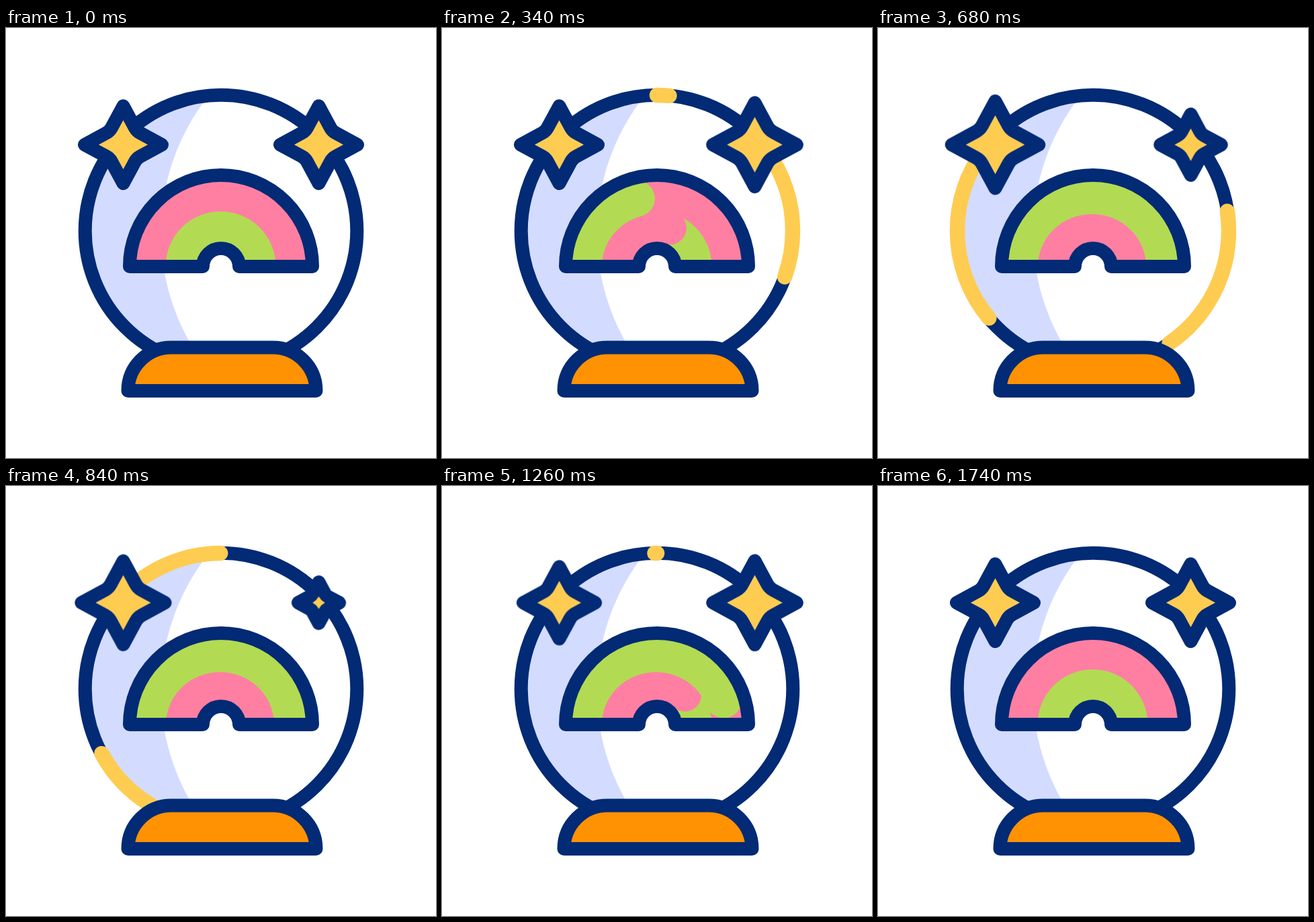
Write an HTML page that moves like this. It is 640 px wide and 640 px high and loops after 3 s.

```html
<!DOCTYPE html>
<html lang="en">
<head>
<meta charset="utf-8">
<title>Crystal ball</title>
<style>
  @property --front { syntax: "<length>"; inherits: false; initial-value: 0px; }
  @property --tail { syntax: "<length>"; inherits: false; initial-value: 0px; }
  @property --size { syntax: "<number>"; inherits: false; initial-value: 1; }

  :root {
    --navy: #022a75;
    --pink: #ff7fa2;
    --green: #b2db53;
    --yellow: #ffcc52;
  }
  html, body { margin: 0; width: 100%; height: 100%; overflow: hidden; background: #fff; }
  svg { display: block; width: 100%; height: 100%; }

  .outline { stroke: var(--navy); stroke-width: 20; stroke-linejoin: round; }

  /* A stroke drawn from --tail to --front along its path */
  .trim {
    fill: none;
    stroke-linecap: round;
    opacity: 0;
    stroke-dasharray: calc(var(--front) - var(--tail)) 999px;
    stroke-dashoffset: calc(var(--tail) * -1);
  }

  .trail {
    stroke: var(--yellow);
    stroke-width: 22.5;
    animation: trail-front 3s infinite, trail-tail 3s infinite, trail-show 3s step-end infinite;
    animation-timing-function: cubic-bezier(.354, 0, .765, 1), cubic-bezier(.354, 0, .765, 1), step-end;
  }
  .trail.late { animation-delay: 276ms; }
  @keyframes trail-front { 0% { --front: 0px } 28.333%, 100% { --front: 360px } }
  @keyframes trail-tail { 0%, 3.333% { --tail: 0px } 33.5%, 100% { --tail: 360px } }
  @keyframes trail-show { 0% { opacity: 0 } .4% { opacity: 1 } 33.5%, 100% { opacity: 0 } }

  .band {
    animation: band-sweep 3s infinite, band-show 3s infinite;
    animation-timing-function: cubic-bezier(.333, 0, .667, 1), step-end;
  }
  .band.late { animation-delay: 76ms; }
  @keyframes band-sweep {
    0% { --front: 0px }
    20%, 35.333% { --front: 180px }
    55.333%, 100% { --front: 0px }
  }
  @keyframes band-show { 0% { opacity: 0 } .4% { opacity: 1 } 55.333%, 100% { opacity: 0 } }

  .star {
    fill: var(--yellow);
    vector-effect: non-scaling-stroke;
    transform: scale(var(--size));
    animation: twinkle 3s cubic-bezier(.333, 0, .667, 1) infinite;
  }
  .star.late { animation-delay: 280ms; }
  @keyframes twinkle {
    0%, 6% { --size: 1 }
    16.167% { --size: 1.155 }
    27.833% { --size: .53 }
    36% { --size: 1.155 }
    48.667%, 100% { --size: 1 }
  }
</style>
</head>
<body>
<svg viewBox="0 0 640 640">
  <defs>
    <path id="arch" d="M184 355A136 136 0 0 1 456 355H347A27 27 0 0 0 293 355Z"/>
    <clipPath id="arch-clip"><use href="#arch"/></clipPath>
  </defs>

  <!-- glass -->
  <circle cx="320" cy="302" r="202" fill="#d3dcfe"/>
  <circle cx="560.5" cy="305" r="330" fill="#fff"/>
  <circle class="outline" cx="320" cy="302" r="202.3" fill="none"/>
  <path class="trim trail" pathLength="360" d="M320 100a202 202 0 0 1 0 404a202 202 0 0 1 0-404"/>
  <path class="trim trail late" pathLength="360" d="M320 100a202 202 0 0 1 0 404a202 202 0 0 1 0-404"/>

  <!-- rainbow -->
  <g clip-path="url(#arch-clip)">
    <use href="#arch" fill="var(--pink)"/>
    <circle cx="319.5" cy="355" r="82" fill="var(--green)"/>
    <path class="trim band" pathLength="180" stroke="var(--pink)" stroke-width="50"
          d="M259.5 355a60.5 60.5 0 0 1 121 0"/>
    <path class="trim band late" pathLength="180" stroke="var(--green)" stroke-width="54"
          d="M211 355a107.5 105 0 0 1 215 0"/>
  </g>
  <use href="#arch" class="outline" fill="none"/>

  <!-- stand -->
  <path class="outline" fill="#ff9203"
        d="M181.5 540A64.5 64.5 0 0 1 246 475.5H397A64.5 64.5 0 0 1 461.5 540Z"/>

  <!-- stars -->
  <g transform="translate(174.5 173.7)">
    <path class="outline star late" d="M0-57.5L17.4-25.3Q20.2-20.2 25.3-17.4L57.5 0L25.3 17.4Q20.2 20.2 17.4 25.3L0 57.5L-17.4 25.3Q-20.2 20.2-25.3 17.4L-57.5 0L-25.3-17.4Q-20.2-20.2-17.4-25.3Z"/>
  </g>
  <g transform="translate(465.5 173.7)">
    <path class="outline star" d="M0-57.5L17.4-25.3Q20.2-20.2 25.3-17.4L57.5 0L25.3 17.4Q20.2 20.2 17.4 25.3L0 57.5L-17.4 25.3Q-20.2 20.2-25.3 17.4L-57.5 0L-25.3-17.4Q-20.2-20.2-17.4-25.3Z"/>
  </g>
</svg>
</body>
</html>
```
